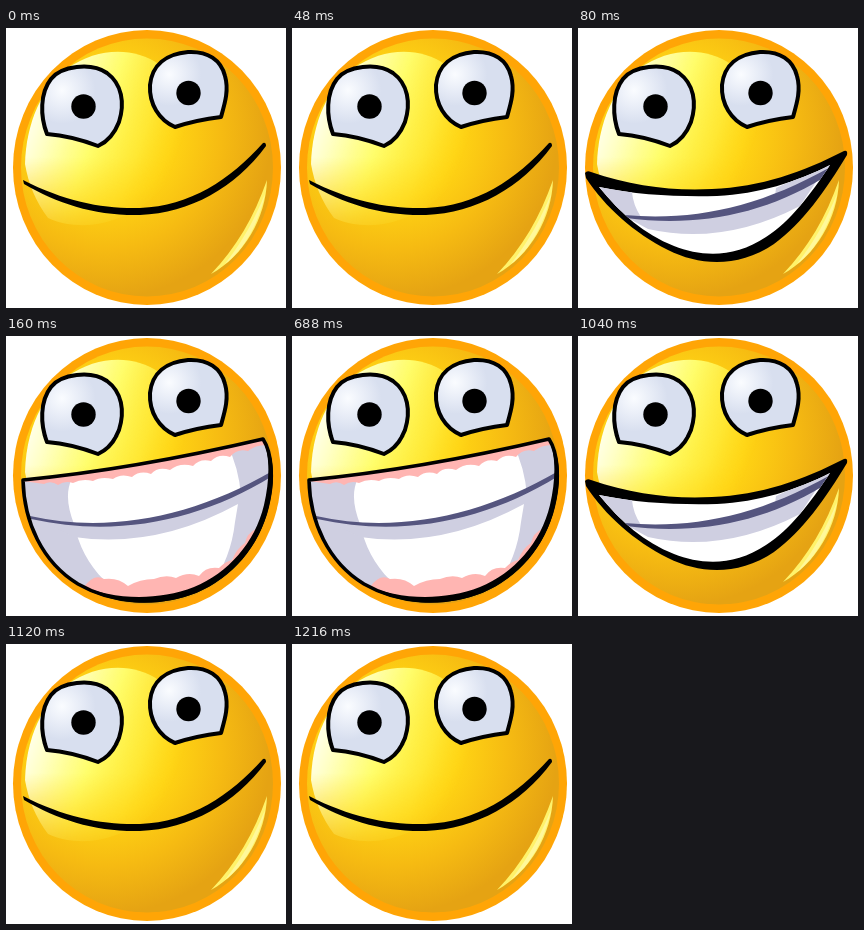
An HTML page that plays this animation: 280 px wide and 280 px high, repeating every 1.28 s.

```html
<!DOCTYPE html>
<html lang="en">
<head>
<meta charset="utf-8">
<title>Grinning face</title>
<style>
html, body { margin: 0; width: 100%; height: 100%; overflow: hidden; background: #fff; }
svg { display: block; width: 100vw; height: 100vh; }
.ink { fill: none; stroke: #000; stroke-linejoin: round; stroke-linecap: round; }
.mouth { animation: 1280ms step-end infinite; }
.closed { animation-name: closed; }
.half { animation-name: half; visibility: hidden; }
.wide { animation-name: wide; visibility: hidden; }
@keyframes closed {
  0%, 87.5% { visibility: visible; }
  6.25% { visibility: hidden; }
}
@keyframes half {
  0%, 12.5%, 87.5% { visibility: hidden; }
  6.25%, 81.25% { visibility: visible; }
}
@keyframes wide {
  0%, 81.25% { visibility: hidden; }
  12.5% { visibility: visible; }
}
</style>
</head>
<body>
<svg viewBox="0 0 280 280">
  <defs>
    <radialGradient id="skin" gradientUnits="userSpaceOnUse" cx="100" cy="105" r="165">
      <stop offset="0" stop-color="#ffe424"/>
      <stop offset=".4" stop-color="#ffd414"/>
      <stop offset=".7" stop-color="#f6bb12"/>
      <stop offset="1" stop-color="#e5a313"/>
    </radialGradient>
    <linearGradient id="glare" gradientUnits="userSpaceOnUse" x1="22" y1="88" x2="166" y2="142">
      <stop offset="0" stop-color="#fffff0"/>
      <stop offset=".16" stop-color="#ffffc4"/>
      <stop offset=".45" stop-color="#ffff70" stop-opacity=".95"/>
      <stop offset=".75" stop-color="#fff044" stop-opacity=".6"/>
      <stop offset="1" stop-color="#ffe020" stop-opacity="0"/>
    </linearGradient>
    <linearGradient id="fade" x1="0" y1="0" x2="0" y2="1">
      <stop offset=".6" stop-color="#fff"/>
      <stop offset="1" stop-color="#000"/>
    </linearGradient>
    <mask id="fadeDown"><rect width="280" height="215" fill="url(#fade)"/></mask>
    <radialGradient id="eyeball" cx=".25" cy=".3" r=".7">
      <stop offset="0" stop-color="#fafcff"/>
      <stop offset=".35" stop-color="#e6ebf6"/>
      <stop offset=".6" stop-color="#d8dfef"/>
    </radialGradient>
    <path id="leftEye" d="M41 106C34 88 34 65 45 51C55 38 85 34 101 45C116 56 119 75 113 94C108 107 101 114 92 118Q66 108 41 106Z"/>
    <path id="rightEye" d="M169 99C153 92 143 76 144 57C146 37 160 26 182 24C202 23 215 32 219 48C223 62 219 75 215 89Q190 92 169 99Z"/>
    <path id="teeth" d="M21 159C60 167 99 169 139 168C181 166 218 154 252 137C233 166 212 194 188 209C157 230 124 229 96 218C66 206 43 186 21 159Z"/>
    <path id="wideMouth" d="M17 144C99 136 180 121 257 103C266 117 268 143 261 170C252 209 225 240 190 255C150 271 105 267 72 248C36 226 18 186 17 144Z"/>
    <clipPath id="face"><ellipse cx="141" cy="139.5" rx="126" ry="129"/></clipPath>
    <clipPath id="teethClip"><use href="#teeth"/></clipPath>
    <clipPath id="wideClip"><use href="#wideMouth"/></clipPath>
  </defs>

  <ellipse cx="141" cy="139.5" rx="134" ry="137.5" fill="#ffa506"/>
  <ellipse cx="141" cy="139.5" rx="126" ry="129" fill="url(#skin)"/>
  <g clip-path="url(#face)">
    <path d="M19 136C20 95 36 59 62 40C91 20 127 18 154 37C184 65 184 120 166 150C130 194 80 207 42 190Q24 166 19 136Z" fill="url(#glare)" mask="url(#fadeDown)"/>
  </g>
  <path d="M261 152C260 190 238 228 205 246C230 220 248 189 261 152Z" fill="#fff26a"/>
  <path d="M259 166C253 195 238 222 219 236C237 213 249 190 259 166Z" fill="#fff89a"/>

  <g>
    <use href="#leftEye" fill="url(#eyeball)"/>
    <use href="#rightEye" fill="url(#eyeball)"/>
    <use href="#leftEye" class="ink" stroke-width="4"/>
    <use href="#rightEye" class="ink" stroke-width="4"/>
    <circle cx="77.5" cy="78.5" r="12.2"/>
    <circle cx="182.5" cy="65" r="12.2"/>
  </g>

  <path class="mouth closed" d="M17 152C60 174 98 181 134 180C184 178 224 152 257 115Q260 114 260 118C229 160 184 185 134 187C90 188 52 176 18 156Z"/>

  <g class="mouth half">
    <path d="M7 145Q9 142 13 144C54 158 93 163 134 161C183 159 225 144 266 123Q270 122 269 127C248 162 224 196 196 216C160 240 122 238 90 222C56 205 27 179 8 150Z"/>
    <use href="#teeth" fill="#fff"/>
    <g clip-path="url(#teethClip)" fill="#cfcfe1">
      <path d="M18 156L54 164Q55 177 63 189L48 190Z"/>
      <path d="M198 160L255 134L242 151Q220 167 196 176Z"/>
      <path d="M48 189C114 198 178 183 240 151L222 178Q145 218 70 201Z"/>
      <path d="M46 187C115 193 180 180 254 138L245 150C183 188 116 199 48 190Z" fill="#55557f"/>
    </g>
  </g>

  <g class="mouth wide">
    <use href="#wideMouth" fill="#fff"/>
    <g clip-path="url(#wideClip)">
      <g fill="#cfcfe1">
        <path d="M14 142H66C59 157 62 172 68 188C73 210 82 228 98 244L70 255L15 200Z"/>
        <path d="M221 108L260 100L272 145L235 160Q233 132 221 108Z"/>
        <path d="M26 181C104 201 194 183 264 138L265 175L205 250Q225 222 229 186L232 168Q150 213 68 201Z"/>
      </g>
      <g fill="#ffb5b2">
        <path d="M15 140L260 100V109Q249 109 242 115Q231 112 224 121Q213 117 205 125Q194 122 187 130Q174 126 164 134Q152 130 145 138Q134 134 126 141Q115 137 107 143Q95 140 87 145Q76 142 67 147Q59 144 52 149Q45 144 38 148L17 145Z"/>
        <path d="M78 251Q88 237 98 243Q112 241 122 250Q134 243 148 243Q160 238 170 242Q182 235 193 240Q200 230 213 232Q220 225 226 224Q231 212 239 207Q241 197 250 193L264 200L205 270H90Z"/>
      </g>
      <path d="M24 180C104 198 190 180 268 134V139C195 185 110 202 25 183Z" fill="#55557f"/>
    </g>
    <use href="#wideMouth" class="ink" stroke-width="3.6"/>
    <path d="M257 103C268 117 270 143 263 171C253 211 226 242 190 257C149 273 104 268 72 249C106 263 149 266 188 251C222 237 249 207 258 169C264 143 264 119 257 103Z"/>
  </g>
</svg>
</body>
</html>
```
